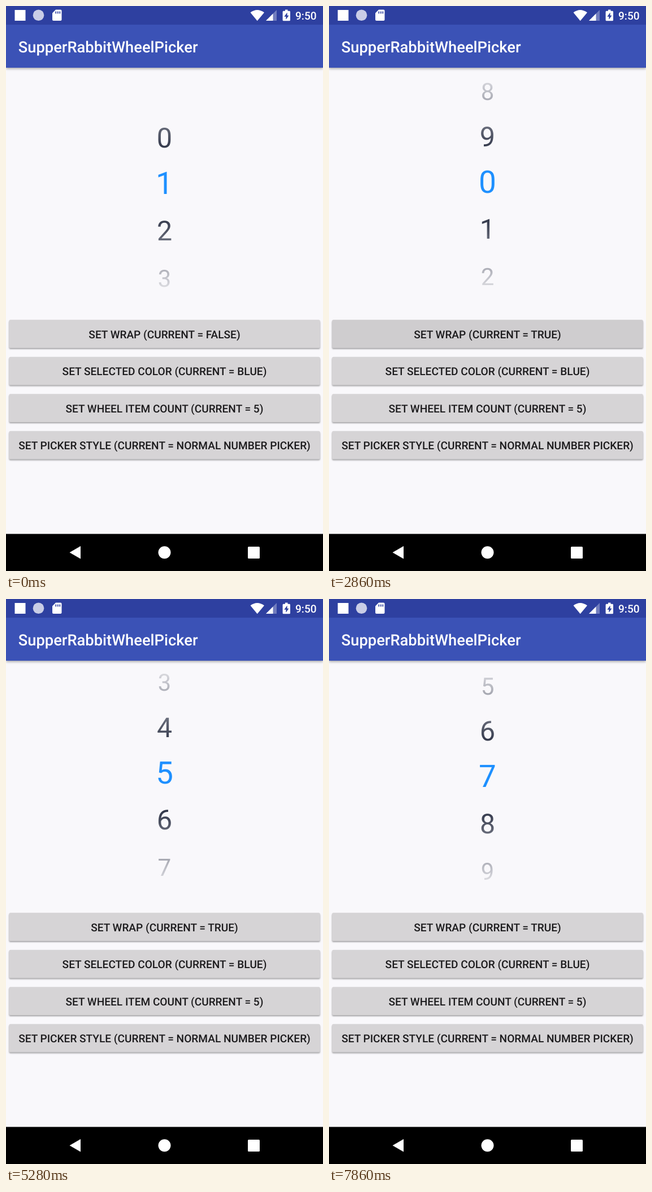
Write an HTML page that moves like this. It is 561x998 px and loops after 8 s.

```html
<!DOCTYPE html>
<html lang="en">
<head>
<meta charset="utf-8">
<title>Wheel picker</title>
<style>
  html, body { margin: 0; width: 100%; height: 100%; overflow: hidden; background: #f9f8fb; }
  svg { display: block; width: 561px; height: 998px; }
  text { font-family: Roboto, sans-serif; font-weight: 500; text-rendering: geometricPrecision; }
  .bar { filter: drop-shadow(0 2px 2px rgba(0, 0, 0, .32)); }
  .button { fill: #d6d4d6; filter: drop-shadow(0 2px 1.3px rgba(0, 0, 0, .33)); }
  .label { font-size: 19.1px; fill: #1b1a1c; text-anchor: middle; }
  .digit { font-weight: 400; text-anchor: middle; }
</style>
</head>
<body>
<svg viewBox="0 0 561 998">
  <defs>
    <linearGradient id="fade" x1="0" y1="0" x2="0" y2="1">
      <stop offset="0" stop-color="#fff" stop-opacity="0"/>
      <stop offset=".38" stop-color="#fff"/>
      <stop offset=".62" stop-color="#fff"/>
      <stop offset="1" stop-color="#fff" stop-opacity="0"/>
    </linearGradient>
    <mask id="edges" maskUnits="userSpaceOnUse" x="200" y="109" width="161" height="409">
      <rect x="200" y="109" width="161" height="409" fill="url(#fade)"/>
    </mask>
  </defs>

  <rect width="561" height="998" fill="#f9f8fb"/>
  <g id="wheel" mask="url(#edges)"></g>
  <g id="buttons"></g>

  <rect class="bar" y="30" width="561" height="79" fill="#3b52b6"/>
  <rect width="561" height="33" fill="#2e40a0"/>
  <text x="21.8" y="81.5" font-size="27.3" fill="#fff">SupperRabbitWheelPicker</text>

  <g fill="#fff">
    <rect x="15.5" y="7" width="19" height="19"/>
    <circle cx="57.5" cy="16.3" r="9.8" fill="#c9cde6"/>
    <path d="M88 6.5H96.500Q98.500 6.500 98.500 8.500V24Q98.500 26 96.500 26H84Q82 26 82 24V12.500Z"/>
    <path d="M88.300 9.500v4M91.800 9.500v4M95.300 9.500v4" stroke="#2e40a0" stroke-width="1.700"/>
    <path d="M432.500 11.500Q444.500 2.500 457 11.500L444.700 26.300Z"/>
    <path d="M479 7V26H460Z" fill-opacity=".32"/>
    <path d="M472.500 13.500V26H460Z"/>
    <path d="M494 6.500h4.500v2.300h3q1.500 0 1.500 1.500V24.800q0 1.500-1.500 1.500h-10.400q-1.500 0-1.500-1.500V10.300q0-1.500 1.500-1.500h2.900Z"/>
    <path d="M497.600 11.500L492.300 18.700H495.400V24L500.500 16.700H497.600Z" fill="#2e40a0"/>
    <text x="512" y="23.500" font-size="19.1">9:50</text>
  </g>

  <rect y="932.500" width="561" height="66" fill="#000"/>
  <g fill="#fff">
    <path d="M112.500 965.300L132 954V976.600Z"/>
    <circle cx="280.500" cy="965.300" r="11"/>
    <rect x="428" y="955" width="21" height="21" rx="1.500"/>
  </g>
</svg>
<script>
const LOOP = 8000, FPS = 7;
const PITCH = 81.7, BASE = 329.7, MID = 280.5;
const WRAP_STEP = 17;

// [step, value] pairs, linear in between
const SCROLL = [
  [0, .97], [1, .55], [2, .32], [3, .18], [4, .1], [5, .05], [6, .02], [8, 0],
  [9, -.05], [10, -.13], [11, -.06], [12, 0], [21, 0],
  [22, .12], [24, .9], [27, 2.6], [30, 4.2], [33, 4.88], [35, 4.98], [37, 5.05],
  [41, 5.53], [44, 6.6], [47, 7.6], [49, 7.92], [50, 7.97], [51, 7.9], [53, 7.35], [55, 6.97]
];
const PRESS = [[16, 0], [17, .012], [20, .032], [21, .032], [25, 0]];

const LABELS = [
  'SET WRAP (CURRENT = FALSE)',
  'SET SELECTED COLOR (CURRENT = BLUE)',
  'SET WHEEL ITEM COUNT (CURRENT = 5)',
  'SET PICKER STYLE (CURRENT = NORMAL NUMBER PICKER)'
];

function add(parent, tag, attrs) {
  const el = document.createElementNS('http://www.w3.org/2000/svg', tag);
  set(el, attrs);
  return parent.appendChild(el);
}

function set(el, attrs) {
  for (const key in attrs) el.setAttribute(key, attrs[key]);
}

function at(table, x) {
  const i = table.findIndex(([step]) => step >= x);
  if (i < 0) return table[table.length - 1][1];
  if (i === 0) return table[0][1];
  const [x0, y0] = table[i - 1], [x1, y1] = table[i];
  return y0 + (y1 - y0) * (x - x0) / (x1 - x0);
}

const wheel = document.getElementById('wheel');
const buttons = document.getElementById('buttons');
const digits = Array.from({ length: 7 }, () => add(wheel, 'text', { class: 'digit', x: MID }));

const box = i => ({ x: 5.4, y: 554.3 + i * 65.5, width: 550.4, height: 49.6, rx: 2.5 });
LABELS.forEach((_, i) => add(buttons, 'rect', { class: 'button', ...box(i) }));
const shade = add(buttons, 'rect', box(0));
const labels = LABELS.map((label, i) => {
  const el = add(buttons, 'text', { class: 'label', x: MID, y: 586.5 + i * 65.5 });
  el.textContent = label;
  return el;
});

function draw(step) {
  const pos = at(SCROLL, step);
  const wrap = step >= WRAP_STEP;
  const first = Math.round(pos) - 3;

  digits.forEach((el, i) => {
    const n = first + i, offset = n - pos, dist = Math.abs(offset);
    el.textContent = wrap || n >= 0 ? (n + 10) % 10 : '';
    set(el, {
      y: BASE + offset * PITCH,
      'font-size': 55 - 6.5 * dist,
      fill: dist < .5 ? '#1e90ff' : '#1f2539'
    });
  });

  labels[0].textContent = wrap ? LABELS[0].replace('FALSE', 'TRUE') : LABELS[0];
  set(shade, { 'fill-opacity': at(PRESS, step) });
}

const start = performance.now();
let last = -1;

function tick() {
  const t = (performance.now() - start) % LOOP;
  const step = Math.floor((t + 6) * FPS / 1000) % (LOOP * FPS / 1000);
  if (step !== last) draw(last = step);
  requestAnimationFrame(tick);
}
tick();
</script>
</body>
</html>
```
